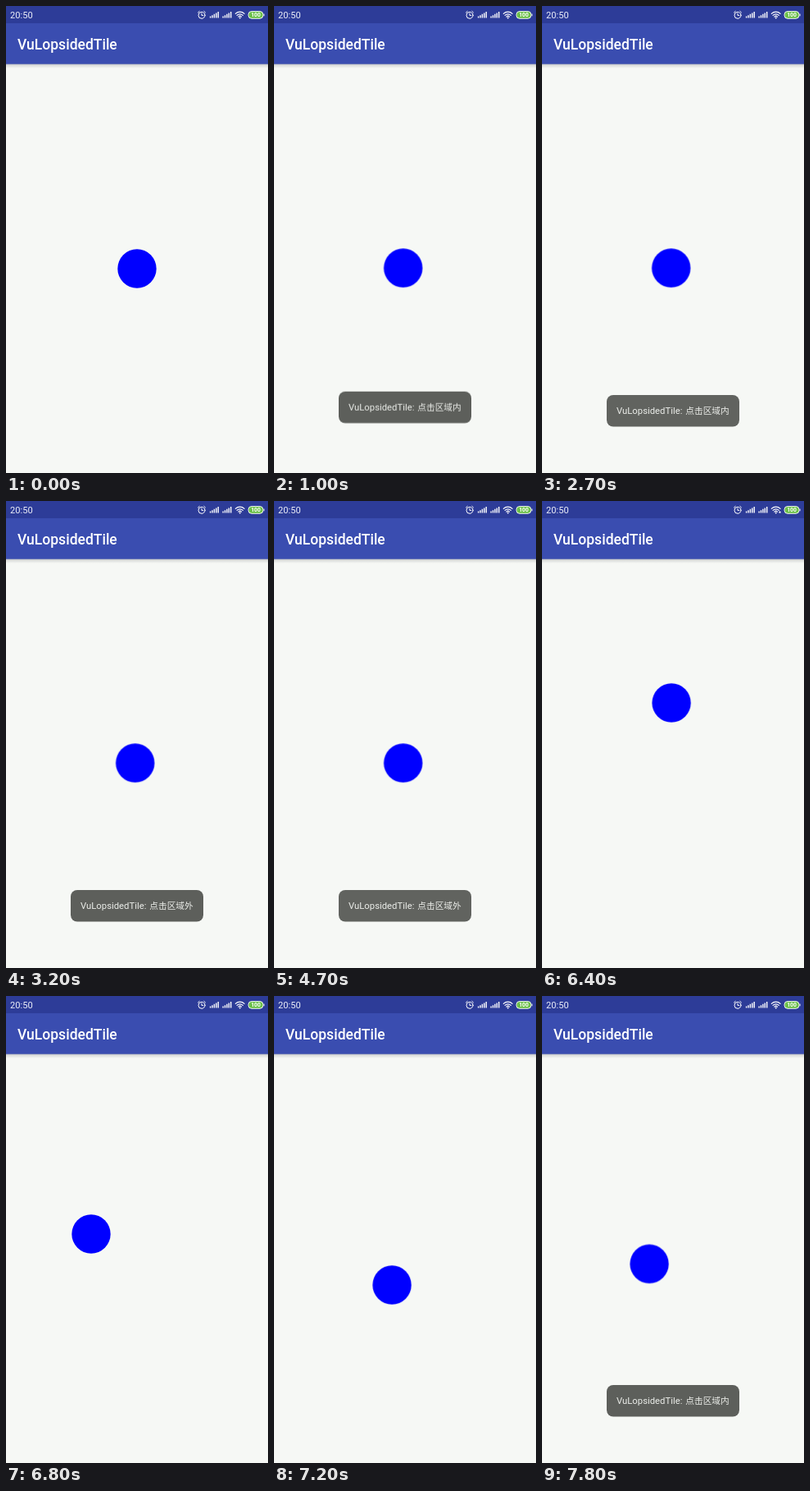
These frames come from a looping animation (320x569 px, 8.6 s). An HTML page without scripts:

```html
<!DOCTYPE html>
<html lang="zh">
<head>
<meta charset="utf-8">
<title>Drag the ball</title>
<style>
  html, body { margin: 0; width: 100%; height: 100%; overflow: hidden; background: #f6f8f5; }
  svg { display: block; width: 100%; height: 100%; }
  text { font-family: Roboto, sans-serif; fill: #fff; }
  .clock { font-size: 11.1px; fill: #eceef8; }
  .title { font-size: 17.5px; font-weight: 500; }
  .charge { font-size: 6.8px; font-weight: 700; text-anchor: middle; }
  .line { fill: none; stroke: #fff; stroke-linecap: round; }
  .toast text { font-size: 11.3px; fill: #eceeea; }
  .toast .cjk { font-family: "Noto Sans CJK SC", "Noto Sans CJK", sans-serif; font-size: 10.7px; }

  /* All motion ticks at 10 steps per second; the small lead avoids edge rounding. */
  .ball, .toast, .traffic { animation: 8.6s -0.01s infinite step-end; }
  .ball { animation-name: drag; animation-timing-function: steps(2); }
  .inside { animation-name: inside; }
  .outside { animation-name: outside; }
  .traffic { animation-name: traffic; }

  @keyframes drag {
    0%, 4.65% { transform: translate(160px, 320px); }
    6.98% { transform: translate(157.7px, 319.2px); }
    61.63% { transform: translate(157.7px, 319.2px); animation-timing-function: step-end; }
    62.79% { transform: translate(156px, 321px); }
    65.12% { transform: translate(140px, 338px); }
    67.44% { transform: translate(126px, 325px); }
    69.77% { transform: translate(142px, 292px); }
    72.09% { transform: translate(161px, 262px); }
    74.42% { transform: translate(158.1px, 245.9px); }
    76.74% { transform: translate(127px, 255px); }
    79.07% { transform: translate(104px, 290px); }
    81.4% { transform: translate(116px, 335px); }
    83.72% { transform: translate(144.1px, 352.1px); }
    86.05% { transform: translate(135px, 334px); animation-timing-function: step-end; }
    87.21%, 100% { transform: translate(131.1px, 326.4px); }
  }
  @keyframes inside {
    0% { opacity: 0; transform: none; }
    9.3% { opacity: .6; transform: translateY(25px); }
    10.47% { opacity: 1; transform: translateY(4px); }
    11.63% { opacity: 1; transform: translateY(-4.3px); }
    12.79% { opacity: 1; transform: translateY(-2px); }
    13.95% { opacity: 1; transform: none; }
    31.4% { opacity: .97; transform: none; }
    32.56% { opacity: .6; transform: none; }
    33.72% { opacity: .25; transform: none; }
    34.88% { opacity: 0; transform: none; }
    87.21% { opacity: .7; transform: translateY(9px); }
    88.37% { opacity: 1; transform: translateY(-4.3px); }
    89.53% { opacity: 1; transform: translateY(-2px); }
    90.7%, 100% { opacity: 1; transform: none; }
  }
  @keyframes outside {
    0% { opacity: 0; }
    32.56% { opacity: .2; }
    33.72% { opacity: .6; }
    34.88% { opacity: .85; }
    36.05% { opacity: .95; }
    37.21% { opacity: 1; }
    54.65% { opacity: .97; }
    55.81% { opacity: .65; }
    56.98% { opacity: .35; }
    58.14% { opacity: .12; }
    59.3%, 100% { opacity: 0; }
  }
  @keyframes traffic {
    0% { opacity: 0; }
    23.26% { opacity: 1; }
    25.58% { opacity: 0; }
    73.26% { opacity: 1; }
    76.74%, 100% { opacity: 0; }
  }
</style>
</head>
<body>
<svg viewBox="0 0 320 569">
  <defs>
    <linearGradient id="shade" x2="0" y2="1">
      <stop stop-color="#a9acb8"/>
      <stop offset=".4" stop-color="#dcdedd"/>
      <stop offset="1" stop-color="#f6f8f5"/>
    </linearGradient>
    <path id="bars" d="M.8 14.5v-2M3.2 14.5v-3.3M5.6 14.5v-4.7M8 14.5v-6.1M10.4 14.5v-7.6" stroke="#fff" stroke-width="1.4"/>
    <rect id="panel" x="79" y="474" width="162" height="38.5" rx="8" fill="#5d5f5b"/>
  </defs>

  <rect width="320" height="569" fill="#f6f8f5"/>
  <rect y="70" width="320" height="6" fill="url(#shade)"/>
  <rect width="320" height="70.7" fill="#3a4db0"/>
  <rect width="320" height="21" fill="#2d3c98"/>

  <text class="clock" x="5" y="15">20:50</text>
  <g class="line" stroke-width="1">
    <circle cx="239" cy="11.3" r="4"/>
    <path d="M239 9.2v2.3h1.8M234.5 8l1.7-1.6M243.5 8l-1.7-1.6"/>
  </g>
  <use href="#bars" x="248.8"/>
  <use href="#bars" x="264.3"/>
  <g class="line" stroke-width="1.2">
    <path d="M280.3 9.4a7.6 7.6 0 0 1 10.8 0M282.1 11.3a5.1 5.1 0 0 1 7.2 0M283.9 13.1a2.6 2.6 0 0 1 3.6 0"/>
    <circle cx="285.7" cy="14.6" r=".4"/>
  </g>
  <rect class="traffic" x="289.5" y="12.6" width="2" height="2" fill="#fff"/>
  <rect x="296" y="6.5" width="18" height="8.8" rx="4" fill="#6cc04a" stroke="#fff" stroke-width=".9"/>
  <path d="M315 9.5v2.8" stroke="#fff"/>
  <text class="charge" x="305" y="13.4">100</text>

  <text class="title" x="14" y="53">VuLopsidedTile</text>

  <circle class="ball" r="23.7" fill="#00f"/>

  <g class="toast inside">
    <use href="#panel"/>
    <text x="91" y="497.2">VuLopsidedTile:</text>
    <text class="cjk" x="175.3" y="497.2">点击区域内</text>
  </g>
  <g class="toast outside">
    <use href="#panel"/>
    <text x="91" y="497.2">VuLopsidedTile:</text>
    <text class="cjk" x="175.3" y="497.2">点击区域外</text>
  </g>
</svg>
</body>
</html>
```
